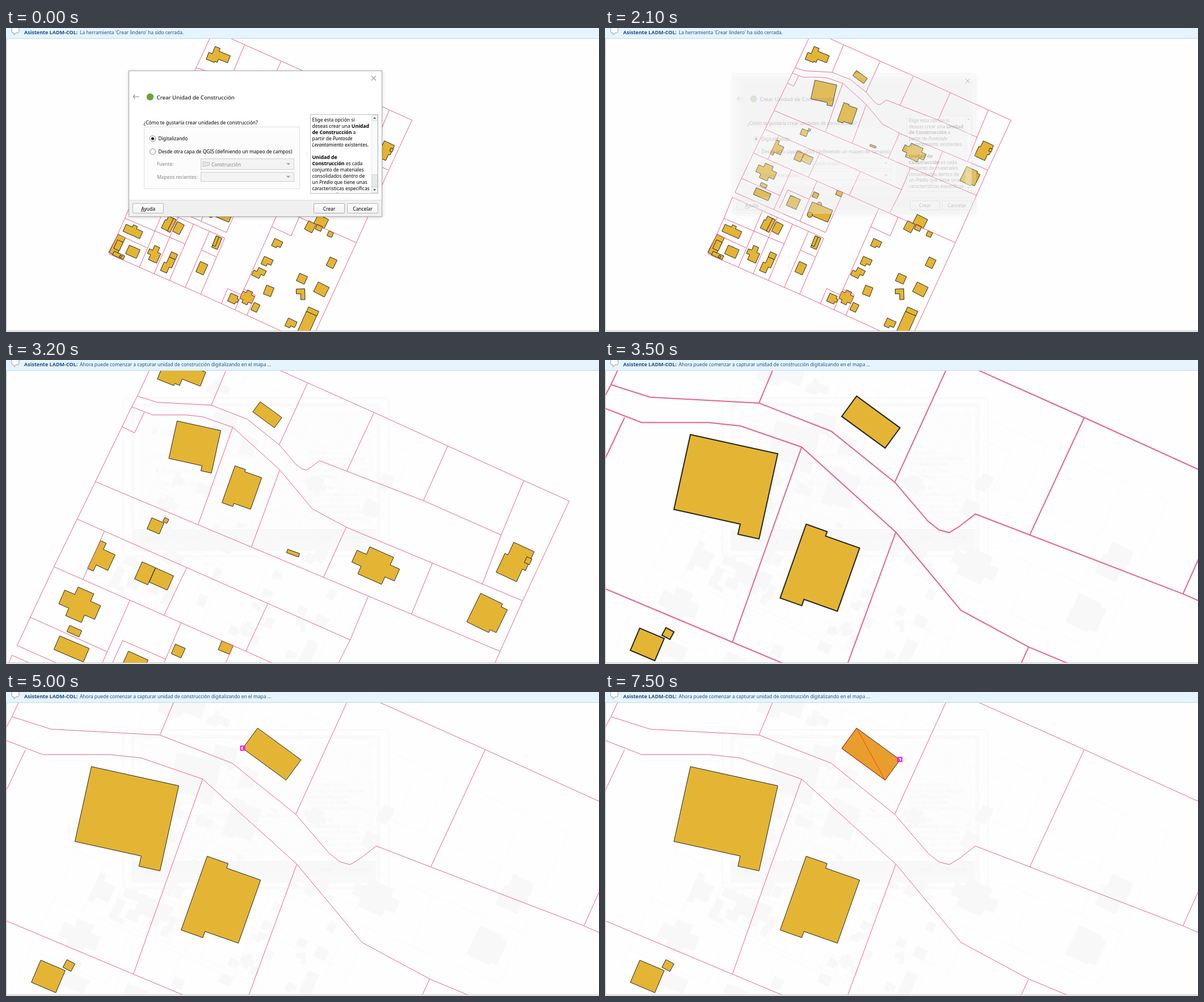
Recreate the animation shown at these times as an HTML page with a canvas. Size 1045 px wide and 536 px high, loop 8 s.

```html
<!DOCTYPE html>
<html lang="es">
<head>
<meta charset="utf-8">
<title>Crear Unidad de Construcción</title>
<style>
html, body { margin: 0; width: 100%; height: 100%; overflow: hidden; background: #fff; }
canvas { display: block; width: 1045px; height: 536px; }
</style>
</head>
<body>
<canvas id="stage" width="1045" height="536"></canvas>
<script>
const ctx = document.getElementById('stage').getContext('2d');
const LOOP = 8000;
const FACE = '"Noto Sans", "Open Sans", sans-serif';
const REGULAR = `8.42px ${FACE}`, BOLD = `bold 8.7px ${FACE}`, ITALIC = `italic 8.42px ${FACE}`;

// Each zoom doubles the scale around the pointer
const zoomIn = (v, x, y) => ({ s: v.s * 2, x: v.x * 2 + x, y: v.y * 2 + y });
const FAR = { s: 1, x: 0, y: 0 };
const MID = zoomIn(FAR, 438, 76);
const NEAR = zoomIn(MID, 452, 83);

const houses = [];
const parcels = new Path2D();

function line(...pts) {
  parcels.moveTo(pts[0], pts[1]);
  for (let i = 2; i < pts.length; i += 2) parcels.lineTo(pts[i], pts[i + 1]);
}

// Draws a boundary from west to east and returns its height at any x
function row(...pts) {
  line(...pts);
  return x => {
    let i = 0;
    while (i < pts.length - 4 && x > pts[i + 2]) i += 2;
    const [x0, y0, x1, y1] = pts.slice(i, i + 4);
    return y0 + (y1 - y0) * (x - x0) / (x1 - x0);
  };
}
const fence = (from, x0, to, x1) => line(x0, from(x0), x1, to(x1));

const north = row(376, 9, 420, 29, 543, 84, 675, 144, 715, 162);
const verge = row(334.5, 69.5, 351.7, 75, 399.7, 77.6, 431.5, 90, 459.7, 112.7, 474.2, 129.7,
  479, 133.5, 483.5, 134.7, 488, 132, 495, 126.5, 586.5, 161.7, 655, 192);
const road = row(329.5, 79, 348, 86.2, 377.5, 86.2, 391.5, 87.7, 418.5, 97, 460, 134.5, 488.7, 169, 518.7, 185.2, 674, 250);
const upper = row(297.5, 145, 388, 183, 654, 294.5);
const middle = row(281.5, 178, 522, 284.5);
const lower = row(261, 220, 430, 294.5, 617, 378);
const lane = row(228.5, 289.5, 388, 360);
const street = row(224, 298, 385, 370);
const yards = row(209, 335, 315, 380);
const south = row(181, 398, 341, 468, 496, 539);

line(367, 0, 334.5, 69.5, 329.5, 79, 297.5, 145, 261, 220, 228.5, 289.5);
line(715, 162, 674, 250, 617, 378, 541, 543);
line(224, 298, 209, 335, 181, 398);
line(340.5, 84, 332, 102, 321, 96.5);
line(240, 264.5, 308, 295);
line(307, 317, 321.5, 285, 359.5, 301.5);
line(196, 363, 248, 387);
line(344, 391, 370, 403);
line(468, 350, 502, 366, 516, 333);
line(379, 486, 390, 459, 414, 470);
line(418, 460, 439, 470, 424, 506);

fence(north, 420, verge, 399.7);
fence(north, 484.5, verge, 459.5);
fence(north, 543, verge, 519);
fence(north, 608, verge, 586.5);
fence(north, 675, verge, 655);
fence(verge, 655, road, 638.5);
fence(road, 418.5, upper, 388);
fence(road, 460, upper, 435);
fence(road, 518.5, upper, 498.5);
fence(road, 594.5, upper, 576);
fence(upper, 538, middle, 522);
fence(middle, 305.5, lower, 286.5);
fence(middle, 378, lower, 358);
fence(middle, 449.5, lower, 430);
fence(middle, 522, lower, 501);
fence(lower, 328, lane, 297);
fence(lower, 373, lane, 343);
fence(lower, 419, lane, 388);
fence(lower, 482, south, 403);
for (const x of [277, 303, 330, 358, 385]) fence(street, x, south, x - 42.5);

// Outline of right-angled walls: lengths alternate along and across, the last wall closes it
function walls(x, y, tilt, ...lengths) {
  const a = tilt * Math.PI / 180, cos = Math.cos(a), sin = Math.sin(a);
  const p = new Path2D();
  let u = 0, v = 0;
  const corner = () => p.lineTo(x + u * cos - v * sin, y + u * sin + v * cos);
  corner();
  lengths.forEach((len, i) => {
    if (i % 2) v += len; else u += len;
    corner();
  });
  u = 0;
  corner();
  p.closePath();
  houses.push(p);
}

// Rectangle around a centre; the named corners (a to d, clockwise) are cut out
function house(x, y, w, h, tilt = 24, cuts = '', cutW = 0, cutH = 0) {
  const a = tilt * Math.PI / 180, cos = Math.cos(a), sin = Math.sin(a);
  const p = new Path2D();
  [[-1, -1], [1, -1], [1, 1], [-1, 1]].forEach(([sx, sy], i) => {
    const inX = 1 - 2 * cutW, inY = 1 - 2 * cutH;
    let steps = [[1, 1]];
    if (cuts.includes('abcd'[i])) {
      steps = [[1, inY], [inX, inY], [inX, 1]];
      if (i % 2) steps.reverse();
    }
    for (const [kx, ky] of steps) {
      const u = sx * kx * w / 2, v = sy * ky * h / 2;
      p.lineTo(x + u * cos - v * sin, y + u * sin + v * cos);
    }
  });
  p.closePath();
  houses.push(p);
}
function tower(x, y, r) {
  const p = new Path2D();
  p.arc(x, y, r, 0, 7);
  houses.push(p);
}

// North of the road and just below it
walls(368, 32, 21.5, 9.5, 5.5, 21.5, 13.3, -17.2, 6, -4.7, 2, -15.6, -13);
walls(369.5, 91.5, 12.4, 39.4, 38.4, -9.5, -4.6);
walls(420.5, 131, 19.4, 9.8, 2.1, 15.9, 29.5, -15.6, 2.9);
house(449, 86, 23.7, 11.1, 36.2);
house(350.5, 184, 11.7, 10.6, 23);
house(359.6, 179.2, 4, 3.8, 28);
house(471.7, 208, 11.2, 3.2, 20);
house(544.5, 219, 41, 26, 24, 'abcd', 0.22, 0.28);
house(667.4, 215.8, 22.8, 30.5, 25, 'ac', 0.13, 0.4);
house(678.8, 214.7, 4.8, 5.6);
house(643.2, 262, 27.5, 28, 26, 'bc', 0.22, 0.1);
// West rows
house(304, 212.8, 17, 27, 25, 'bc', 0.67, 0.22);
house(341.2, 225.8, 12.8, 16.5);
house(355.7, 230.8, 17.4, 13.7);
house(283.7, 253.5, 34.5, 27.5, 23.5, 'abcd', 0.28, 0.26);
house(279, 276.8, 11.6, 6);
house(276.5, 292.5, 28.2, 13, 23);
house(331.4, 307, 19, 19);
house(370.5, 294.3, 9.4, 9.2);
house(412.3, 291.3, 10.8, 8.3, 22);
tower(377, 311, 4.5);
house(378.5, 324, 39, 22.5, 22.6);
tower(360.5, 329, 4.5);
// Block below the lane
house(224, 356.2, 32.2, 18, 24, 'ab', 0.38, 0.25);
house(195.3, 382.3, 14.6, 36, 27);
house(197.6, 382.7, 10.8, 16.5);
house(198, 400.4, 20.6, 7);
house(201.4, 402.4, 3.5, 3.5);
house(223, 394, 20.8, 16.5);
house(260.5, 397.2, 21.8, 27.3, 24, 'abd', 0.28, 0.34);
house(294.5, 401, 12, 10);
house(284.8, 417.4, 16.3, 28, 24, 'ac', 0.27, 0.42);
house(285.2, 344.2, 15, 24.5, 26, 'a', 0.17, 0.34);
house(291.7, 347.6, 5.4, 25, 26);
house(303.3, 352.3, 13.5, 19, 28);
house(371, 378, 10.8, 21.5, 22);
house(369.1, 375.3, 5.4, 18, 22);
house(344.6, 423, 14.3, 19.7);
// South east
house(400.7, 477.3, 17, 15, 24, 'bc', 0.18, 0.3);
house(424.7, 474.5, 23, 24.4, 24, 'abcd', 0.28, 0.22);
house(439, 492, 11.2, 14.3, 26);
house(462.3, 463, 13.9, 16.5, 21);
house(445.2, 431.4, 20.4, 17.6, 27, 'ac', 0.28, 0.47);
house(459.6, 412.1, 17, 14.7, 24, 'c', 0.4, 0.32);
house(477.3, 380.1, 15.7, 14, 25, 'c', 0.4, 0.25);
house(573.3, 413.4, 13.4, 16.5, 26);
house(521, 441.5, 15.2, 14.4);
house(518.7, 469, 15, 19, -2, 'd', 0.5, 0.55);
house(555.2, 460.5, 21.5, 18.8, 27);
house(540, 499.3, 19.8, 9);
house(528.2, 525, 19.8, 48);
house(501.7, 521.2, 17, 15, 25, 'c', 0.44, 0.28);
house(571, 363, 8.9, 9);
house(555, 340.5, 20.5, 17.5, 27);
house(535.7, 350, 14.8, 16.5, 28);
house(551, 352, 10.5, 9);

const INK = { fill: '#e4b534', edge: '#262420', line: '#e6648c' };
const FAINT = { fill: '#f8f8f8', edge: '#f8f8f8', line: '#fafafa' };

function drawMap(v, ink, width = 1) {
  ctx.save();
  ctx.translate(0.5 - v.x, 0.5 - v.y);
  ctx.scale(v.s, v.s);
  ctx.lineWidth = width / v.s;
  ctx.fillStyle = ink.fill;
  ctx.strokeStyle = ink.edge;
  for (const h of houses) {
    ctx.fill(h);
    ctx.stroke(h);
  }
  ctx.strokeStyle = ink.line;
  ctx.stroke(parcels);
  ctx.restore();
}

function text(str, x, y, font = REGULAR, color = '#000') {
  ctx.font = font;
  ctx.fillStyle = color;
  ctx.fillText(str, x, y);
}
function box(x, y, w, h, fill, stroke) {
  if (fill) { ctx.fillStyle = fill; ctx.fillRect(x, y, w, h); }
  if (stroke) { ctx.strokeStyle = stroke; ctx.lineWidth = 1; ctx.strokeRect(x + 0.5, y + 0.5, w - 1, h - 1); }
}
function poly(pts, fill, stroke, closed = true) {
  ctx.beginPath();
  for (const [x, y] of pts) ctx.lineTo(x, y);
  if (closed) ctx.closePath();
  if (fill) { ctx.fillStyle = fill; ctx.fill(); }
  if (stroke) { ctx.strokeStyle = stroke; ctx.stroke(); }
}
function disc(x, y, r, fill, stroke) {
  ctx.beginPath();
  ctx.arc(x, y, r, 0, 7);
  ctx.fillStyle = fill;
  ctx.fill();
  if (stroke) { ctx.strokeStyle = stroke; ctx.lineWidth = 1; ctx.stroke(); }
}
const arrow = (x, y, w, h, color) => poly([[x - w, y - h / 2], [x + w, y - h / 2], [x, y + h / 2]], color);

// *bold* and /italic/ runs on one line
function rich(str, x, y) {
  for (const part of str.split(/(\*[^*]+\*|\/[^/]+\/)/)) {
    const font = part[0] === '*' ? BOLD : part[0] === '/' ? ITALIC : REGULAR;
    const run = font === REGULAR ? part : part.slice(1, -1);
    text(run, x, y, font);
    x += ctx.measureText(run).width;
  }
}

const HELP = ['Elige esta opción si', 'deseas crear una *Unidad*', '*de Construcción* a', 'partir de /Puntosde/',
  '/Levantamiento/ existentes.', '', '*Unidad de*', '*Construcción* es cada', 'conjunto de materiales',
  'consolidados dentro de', 'un /Predio/ que tiene unas', 'caracteristicas específicas', 'respecto a las otras'];
const DIM = '#858585';

function button(label, x, border) {
  const g = ctx.createLinearGradient(0, 309, 0, 327);
  g.addColorStop(0, '#fefefe');
  g.addColorStop(1, '#f0f0f0');
  ctx.beginPath();
  ctx.roundRect(x + 0.5, 309.5, 54, 17, 1.5);
  ctx.fillStyle = g;
  ctx.fill();
  ctx.strokeStyle = border;
  ctx.lineWidth = 1;
  ctx.stroke();
  ctx.textAlign = 'center';
  text(label, x + 27.5, 321.5);
  ctx.textAlign = 'left';
}
function combo(label, y, h) {
  text(label, 266, y + h / 2 + 3.2, REGULAR, DIM);
  box(343, y, 165, h, '#f3f3f3', '#cdcdcd');
  arrow(497.5, y + h / 2, 3.5, 3.5, '#9c9c9c');
}
function radio(label, y, on) {
  disc(258.5, y, 5.1, '#fff', '#888');
  if (on) disc(258.5, y, 2.6, '#222');
  text(label, 268.5, y + 3.3);
}
function helpPanel() {
  box(536, 152, 120, 140, '#fff', '#b9bcc0');
  ctx.save();
  ctx.beginPath();
  ctx.rect(537, 153, 107, 138);
  ctx.clip();
  HELP.forEach((s, i) => rich(s, 539.5, 164.5 + 11 * i));
  ctx.restore();
  box(644, 153, 11, 138, '#fafafa', '#e6e6e6');
  for (const y of [153, 280]) box(644, y, 11, 11, '#f5f5f5', '#dcdcdc');
  box(644, 258, 11, 22, '#e8e8e8', '#d4d4d4');
  arrow(649.5, 158.5, 2.6, -3.2, '#555');
  arrow(649.5, 285.5, 2.6, 3.2, '#555');
}

function dialog(active, scale = 1, alpha = 1) {
  ctx.save();
  ctx.globalAlpha = alpha;
  ctx.translate(439.5, 204);
  ctx.scale(scale, scale);
  ctx.translate(-439.5, -204);

  ctx.save();
  ctx.shadowColor = active ? 'rgba(0,0,0,.26)' : 'rgba(0,0,0,.18)';
  ctx.shadowBlur = active ? 10 : 6;
  ctx.shadowOffsetY = active ? 2 : 1;
  box(216, 75, 447, 258, '#fff');
  ctx.restore();
  box(216, 303, 447, 30, '#f0f0f0');
  box(216, 303, 447, 1, '#dfdfdf');
  box(216, 75, 447, 258, null, active ? '#d0d0d0' : '#a9a9a9');

  ctx.lineWidth = 1.1;
  for (const k of [-4, 4]) poly([[648 - k, 84.5], [648 + k, 92.5]], null, active ? '#111' : '#979797', false);
  poly([[234.5, 121], [224, 121]], null, '#8d8d8d', false);
  poly([[227.5, 117.5], [224, 121], [227.5, 124.5]], null, '#8d8d8d', false);
  disc(254, 121.5, 6.2, '#6ba534');
  text('Crear Unidad de Construcción', 265.5, 125.5, `9.75px ${FACE}`);

  text('¿Cómo te gustaría crear unidades de construcción?', 242.5, 169.5);
  box(243, 174, 275, 110, '#fcfcfc', '#e0e0e0');
  radio('Digitalizando', 195, true);
  radio('Desde otra capa de QGIS (definiendo un mapeo de campos)', 218, false);
  combo('Fuente:', 230, 20);
  combo('Mapeos recientes:', 254, 17);
  poly([[347, 236], [352, 236], [353, 237.5], [359.5, 237], [358, 242], [347, 244.5]], '#e6e6e6', '#c4c4c4');
  text('Construcción', 362, 243.5, REGULAR, DIM);
  box(530, 217, 1, 11, '#e8e8e8');
  helpPanel();

  button('Ayuda', 223, '#b8b8b8');
  box(238, 322.5, 5.5, 0.8, '#111');
  button('Crear', 542, active ? '#4aa3e4' : '#adadad');
  button('Cancelar', 601, '#b8b8b8');
  ctx.restore();
}

// Trace left on the canvas by the closed dialog
function dialogTrace() {
  ctx.lineWidth = 3;
  ctx.strokeStyle = '#fafafa';
  ctx.beginPath();
  ctx.roundRect(207, 67, 468, 279, 8);
  ctx.stroke();
  ctx.lineWidth = 5;
  ctx.strokeRect(223, 79, 434, 255);
  box(222, 298, 430, 37, '#f9f9f9');
  dialog(false, 0.957, 0.03);
}

function messageBar(message) {
  box(0, 0, 1045, 19, '#e5f4fe');
  box(0, 18, 1045, 1, '#b9dcee');
  ctx.lineWidth = 1;
  ctx.beginPath();
  ctx.roundRect(10, -2, 13, 10.5, 2.5);
  ctx.fillStyle = '#fbfdfe';
  ctx.fill();
  ctx.strokeStyle = '#8f9da8';
  ctx.stroke();
  poly([[13.5, 8], [14.5, 12.3], [18, 8]], '#fbfdfe', '#8f9da8', false);
  text('Asistente LADM-COL:', 32, 10.5, `bold 9px ${FACE}`, '#1c4a8c');
  text(message, 130, 10.5, REGULAR, '#1f4f93');
}

// Corners in order of capture, with the times the pointer leaves for and reaches each one
const STOPS = [
  { x: 443, y: 63, from: 3800, to: 3800 },
  { x: 417, y: 99, from: 4500, to: 5000 },
  { x: 493, y: 155, from: 5700, to: 5900 },
  { x: 519.5, y: 119, from: 7100, to: 7500 }
];
const CLICKS = [4500, 5500, 7100];
const SLIP = { from: 6100, to: 6700, x: 7, y: -4 };
const TICK = 100, BOW = 8;

// Pointer path: a bowed line between corners, snapped on arrival
function pointer(t) {
  const i = STOPS.filter(s => s.from <= t).length - 1;
  if (i < 0) return null;
  const b = STOPS[i], a = STOPS[i - 1] || b;
  if (t >= SLIP.from && t < SLIP.to) return { x: b.x + SLIP.x, y: b.y + SLIP.y };
  if (t >= b.to) return { x: b.x, y: b.y, snapped: true };
  const p = (Math.floor((t - b.from) / TICK) + 1) * TICK / (b.to - b.from + TICK);
  const dx = b.x - a.x, dy = b.y - a.y;
  const side = BOW * Math.sin(Math.PI * p) / Math.hypot(dx, dy);
  return { x: a.x + dx * p - dy * side, y: a.y + dy * p + dx * side };
}

function marker(x, y) {
  ctx.strokeStyle = '#ff00ff';
  ctx.lineWidth = 2;
  ctx.strokeRect(x - 3.5, y - 3.5, 7, 7);
}

function digitize(t) {
  const tip = pointer(t);
  if (!tip) return;
  const count = CLICKS.filter(c => c <= t).length;
  const fixed = STOPS.slice(0, count).map(s => [s.x, s.y]);
  const wash = 'rgba(255,0,0,.13)';
  ctx.save();
  ctx.translate(0.5, 0.5);
  ctx.lineWidth = 1;
  if (count) {
    const band = [fixed[0], fixed[count - 1], [tip.x, tip.y]];
    if (count > 1) poly(band, wash);
    if (!tip.snapped) {
      ctx.setLineDash([1, 2]);
      poly(band, null, 'rgba(255,0,0,.8)', count > 1);
      ctx.setLineDash([]);
    }
  }
  if (count > 1) poly(fixed, count > 2 && wash, 'rgba(255,20,0,.65)', count > 2);
  ctx.restore();
  if (tip.snapped) marker(tip.x, tip.y);
}

function canvasArea(t) {
  if (t < 3100) {
    if (t >= 2200) dialogTrace();
    drawMap(FAR, INK);
    if (t >= 2900) marker(442.5, 74.5);
    else if (t >= 2800) marker(436.5, 83.5);
    return;
  }
  dialogTrace();
  drawMap(FAR, FAINT);
  // Right after a zoom the old picture is shown enlarged, with thick lines
  if (t < 3500) {
    drawMap(MID, INK, t < 3200 ? 2 : 1);
  } else {
    drawMap(MID, FAINT);
    drawMap(NEAR, INK, t < 3600 ? 2 : 1);
    digitize(t);
  }
}

function draw(t) {
  box(0, 0, 1045, 536, '#fefefe');
  ctx.save();
  ctx.beginPath();
  ctx.rect(1, 19, 1044, 515);
  ctx.clip();
  canvasArea(t);
  ctx.restore();
  box(0, 19, 1.5, 516, '#c9c9c9');
  box(0, 533.5, 1045, 1.5, '#c9c9c9');
  messageBar(t < 2200 ? "La herramienta 'Crear lindero' ha sido cerrada."
    : 'Ahora puede comenzar a capturar unidad de construcción digitalizando en el mapa ...');
  if (t < 2000) dialog(t >= 1900);
  else if (t < 2100) dialog(true, 0.98, 0.6);
  else if (t < 2200) dialog(true, 0.957, 0.2);
}

const start = performance.now();
function tick() {
  draw((performance.now() - start) % LOOP);
  requestAnimationFrame(tick);
}
tick();
</script>
</body>
</html>
```
